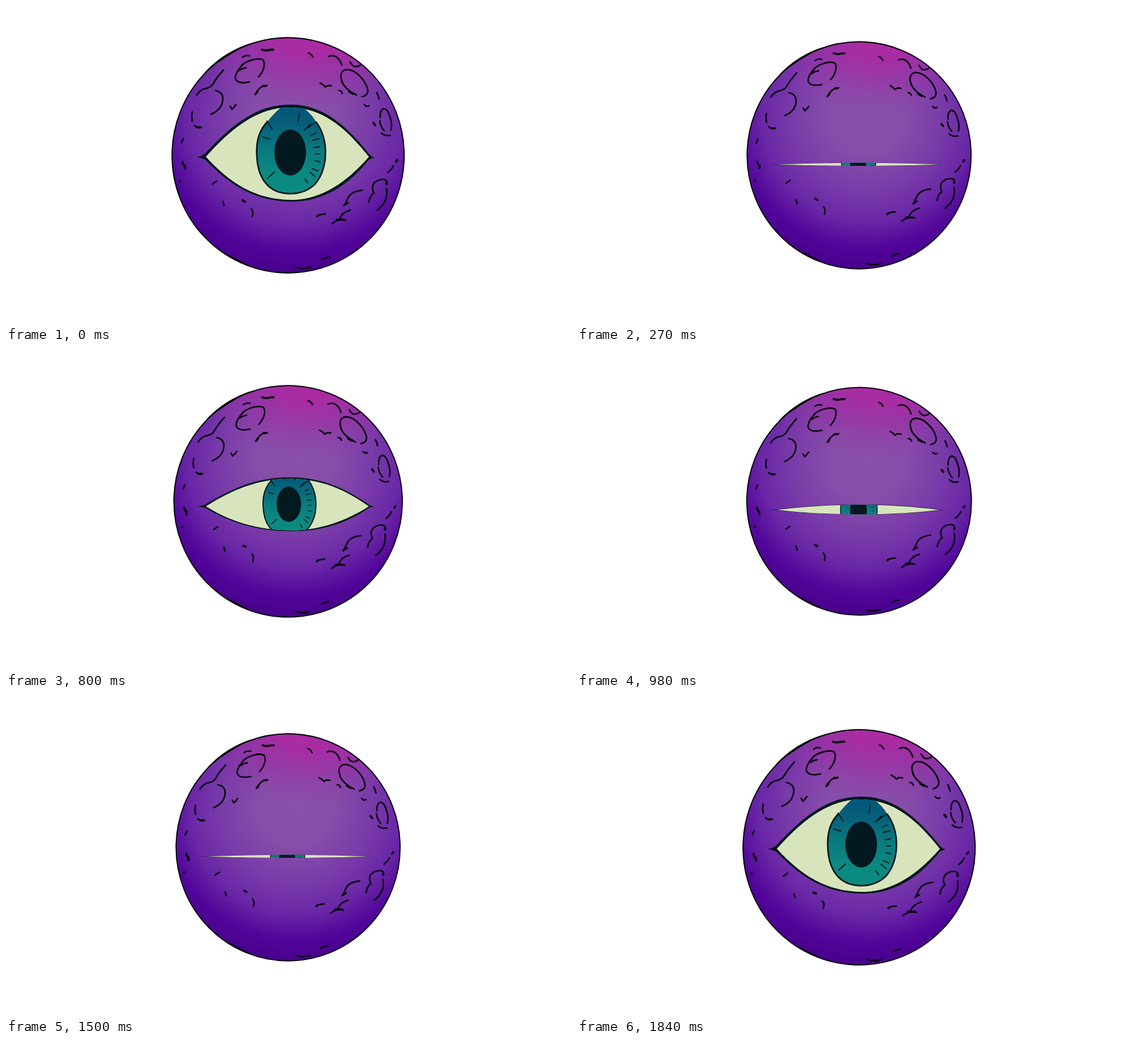
These frames come from a looping animation (998x561 px, 1900 ms). An HTML page:

```html
<!DOCTYPE html>
<html lang="en">
<head>
<meta charset="utf-8">
<title>Blinking eye</title>
<style>
  html, body { margin: 0; width: 100%; height: 100%; overflow: hidden; background: #fff; }
  svg { display: block; width: 100%; height: 100%; }
  .line { fill: none; stroke: #08030f; stroke-width: 2.7; stroke-linecap: round; stroke-linejoin: round; }
  .bold { stroke-width: 3.8; }
  .ink { fill: #04181f; }
  .ray { fill: none; stroke: #04181f; stroke-width: 1.9; stroke-linecap: round; }
</style>
</head>
<body>
<svg viewBox="0 0 998 561">
  <defs>
    <radialGradient id="skin" gradientUnits="userSpaceOnUse" cx="512" cy="192" r="280">
      <stop offset="0" stop-color="#8950a9"/>
      <stop offset=".25" stop-color="#864da9"/>
      <stop offset=".48" stop-color="#7a3ca9"/>
      <stop offset=".68" stop-color="#6a28a6"/>
      <stop offset=".86" stop-color="#52059a"/>
      <stop offset="1" stop-color="#48008b"/>
    </radialGradient>
    <radialGradient id="glow" gradientUnits="userSpaceOnUse" cx="0" cy="0" r="1"
        gradientTransform="translate(542 45) scale(225 140)">
      <stop offset="0" stop-color="#ad2aa2"/>
      <stop offset=".28" stop-color="#ab2ba2" stop-opacity=".95"/>
      <stop offset=".6" stop-color="#a030a4" stop-opacity=".58"/>
      <stop offset="1" stop-color="#9040a6" stop-opacity="0"/>
    </radialGradient>
    <linearGradient id="teal" gradientUnits="userSpaceOnUse" x1="0" y1="179" x2="0" y2="332">
      <stop offset="0" stop-color="#04547a"/>
      <stop offset=".2" stop-color="#065f79"/>
      <stop offset=".5" stop-color="#0a7a7e"/>
      <stop offset=".75" stop-color="#0b8980"/>
      <stop offset="1" stop-color="#0c8c80"/>
    </linearGradient>
    <path id="opening" d="M353 266C395 219 442 179 500 179C560 179 600 215 641 266C600 313 555 342 505 342C440 342 395 312 353 266Z"/>
    <clipPath id="slit"><use class="lid" href="#opening"/></clipPath>
  </defs>

  <g id="ball">
    <ellipse cx="498.3" cy="263.4" rx="205" ry="207.5" fill="url(#skin)"/>
    <ellipse cx="498.3" cy="263.4" rx="205" ry="207.5" fill="url(#glow)" stroke="#08030f" stroke-width="2.1"/>
    <path d="M350 118Q385 80 434 65Q390 86 350 118ZM380 433Q405 451 436 461Q405 445 380 433Z"/>
    <path class="line" d="M418 90q6-4 12-2
      M416 105C424 97 445 90 454 95C459 101 455 116 446 125
      M418 104C408 113 403 125 406 130Q411 138 430 134M412 114q4-4 12-5
      M384 113Q372 126 366 137Q361 145 350 146Q342 149 337 157
      M370 149Q383 152 383 163Q383 182 362 191M329 187Q327 195 329 203M333 211q6 6 12 3
      M440 156Q447 144 453 142T461 140M396 177l3 5q4-3 7-8
      M313 234q-2 4-3 7M365 314l7-5M383 345l2 7M433 358Q438 362 435 371
      M534 83q4 0 8 7M570 89Q577 86 584 90Q591 96 593 104M608 99q4 8 9 8q6 0 10-4
      M555 136q5 2 9 7q4-4 11-2M588 149q5 0 6 5
      M594 134C589 122 592 113 602 112C618 112 636 132 639 148Q640 158 629 160
      M593 133Q599 147 619 157M655 153q3 5 4 11M633 174q4 5 8 2
      M661 197Q660 184 667 181Q674 181 678 195Q683 208 680 219M660 202Q661 212 668 220M663 224Q669 230 679 228
      M684 282Q681 289 674 294M641 346Q643 334 650 330Q646 324 648 316Q654 305 668 306q6 2 5 8
      M672 322Q676 345 656 360M629 325Q608 327 603 341Q600 348 597 352l8-5
      M608 360Q594 364 590 374M576 384Q587 375 600 378M551 370q5-3 13-3
      M512 461q12 5 26 0M558 448Q564 444 572 443"/>
    <path class="line bold" d="M452 77q5 2 10 1t10-1M312 275q0 5 4 7v5M308 309v1M418 343l4 2M550 371l2-2
      M649 206l3 4M689 275l2-3M442 154l2-3M454 141l5 0M606 151l7 4M338 214l5 0M672 312v2M584 377l12 0"/>
  </g>

  <g class="lid">
    <path class="ink" d="M337 267Q347 264 352 260C395 214 440 174 500 174C560 173 602 212 642 262Q646 266 651 267Q645 269 641 271C602 320 557 345 505 345C440 345 395 316 352 271Q347 268 337 267Z"/>
    <use href="#opening" fill="#d8e4bc"/>
  </g>
  <g clip-path="url(#slit)">
    <g id="iris">
      <path fill="url(#teal)" d="M548 205C570 235 570 285 546 314Q527 332 500 331C462 330 444 302 443 262Q441 225 462 204Q472 190 488 177H522Q540 190 548 205Z"/>
      <path class="ray" style="stroke-width:2.8" d="M548 205C570 235 570 285 546 314Q527 332 500 331C462 330 444 302 443 262Q441 225 462 204"/>
      <path class="ray" d="M461 203l9 14M454 231l12 4M462 304l12-11M518 190l-2 13M527 219l11-11M533 215l13-10
        M539 228l9-4M541 237l12-3M544 250l10-2M547 261h7M546 273l9 2M541 287l10 4M537 293l9 8M528 305l5 7"/>
      <ellipse class="ink" cx="502" cy="258.5" rx="28" ry="40.5"/>
    </g>
  </g>
</svg>
<script>
  const LOOP = 1900;
  const CLOSED_Y = 280;
  const MIN_OPEN = 0.008;
  const half = [60, 110, 160, 210, 270, 400, 460, 520, 580, 710, 760, 810, 870, 920];
  const changes = [0, ...half, ...half.map(t => LOOP - t).reverse()];
  const holdEnds = [400, 710, 1320, 1630];

  const ball = document.getElementById('ball');
  const iris = document.getElementById('iris');
  const lids = document.querySelectorAll('.lid');

  // Scale around (x, y), then carry that point to (toX, toY).
  const place = (el, x, y, sx, sy = sx, toX = x, toY = y) =>
    el.setAttribute('transform', `translate(${toX} ${toY}) scale(${sx} ${sy}) translate(${-x} ${-y})`);

  function openness(time) {
    const start = changes.filter(t => t <= time).pop();
    const holds = holdEnds.filter(t => t <= start).length;
    const degrees = 0.6 * (start - 10 * holds);
    const wave = (1 + Math.cos(degrees * Math.PI / 180)) / 2;
    return MIN_OPEN + (1 - MIN_OPEN) * wave;
  }

  function draw(now) {
    const open = openness(now % LOOP);
    place(ball, 498.3, 263.4, 1 - 0.036 * (1 - open));
    lids.forEach(el => place(el, 0, CLOSED_Y, 1, open));
    place(iris, 503, 256, 0.48 + 0.52 * open, undefined, 497 + 6 * open, CLOSED_Y - 24 * open);
  }

  let origin;
  function tick(now) {
    origin ??= now;
    draw(now - origin);
    requestAnimationFrame(tick);
  }
  draw(0);
  requestAnimationFrame(tick);
</script>
</body>
</html>
```
